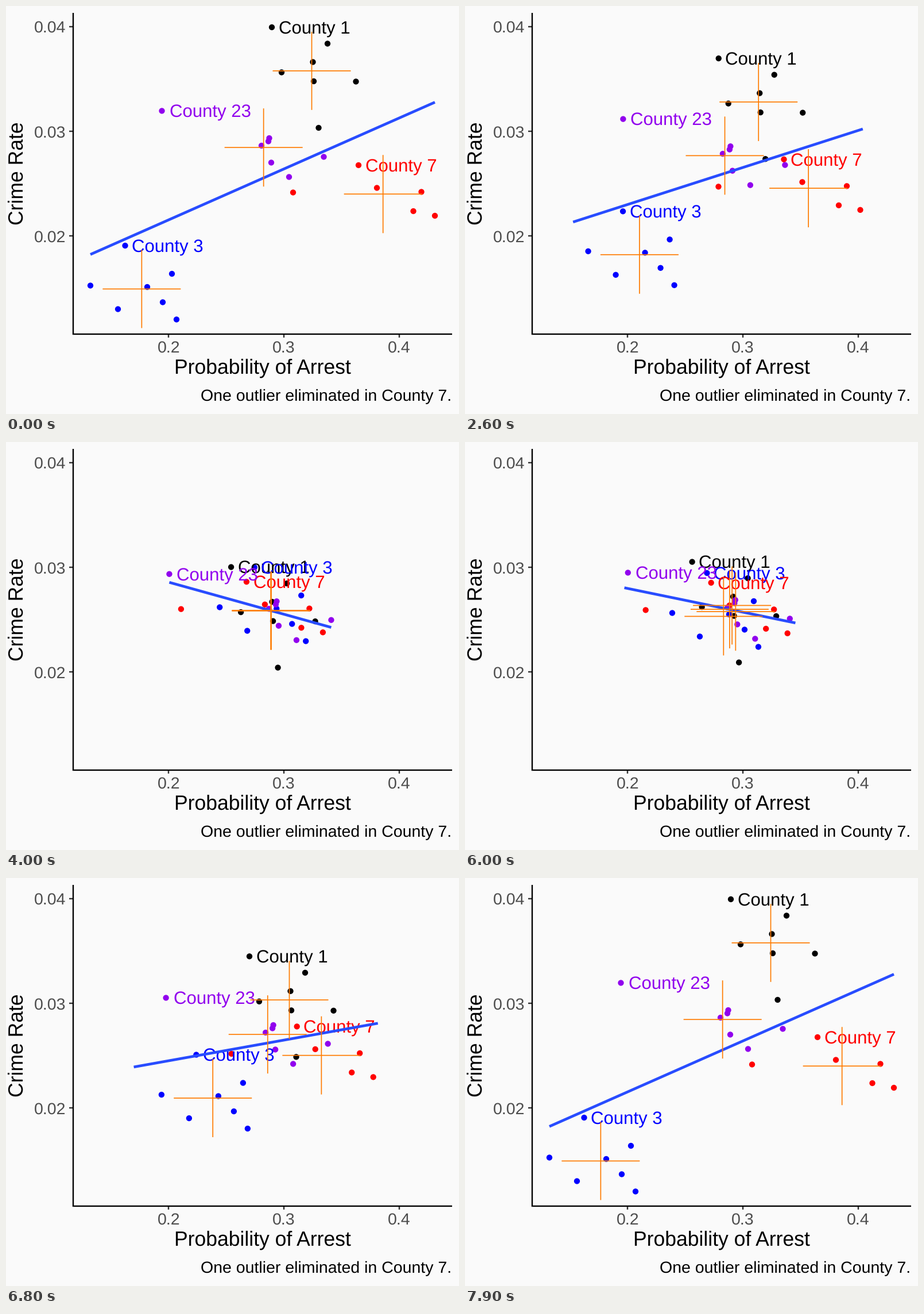
Animation of 789 by 710 pixels, one loop 8000 ms. Source, as a matplotlib script:

```python
import numpy as np
import matplotlib.pyplot as plt
from matplotlib.animation import FuncAnimation

W, H, DPI = 789, 710, 160
PX = 72 / DPI  # points per pixel
FRAMES, STEP_MS = 80, 100
HOLD, MOVE = 20, 20  # frames at rest, frames in motion

plt.rcParams["font.family"] = "Liberation Sans"
plt.rcParams["text.hinting"] = "none"

# label, colour, yearly observations (pixels); the first one carries the label
COUNTIES = [
    ("County 1", "#000000", [(463, 37), (560, 65.5), (534.5, 97.5), (480, 115.5),
                             (536, 131), (609.5, 131.5), (544.5, 212)]),
    ("County 3", "#0000ff", [(207.5, 417), (147, 486.5), (195, 527.5), (246, 489),
                             (289, 466), (273, 515.5), (297, 545.5)]),
    ("County 7", "#ff0000", [(614, 277), (646, 316.5), (723.5, 323.5),
                             (709.5, 357), (747, 365), (500, 324.5)]),
    ("County 23", "#9100ee", [(271.5, 182.5), (445, 243), (457, 235.5), (458.5, 230),
                              (462, 272.5), (493, 297.5), (553.5, 262.5)]),
]
groups = [np.array(pts, float) for _, _, pts in COUNTIES]
means = [g.mean(axis=0) for g in groups]
raw = np.vstack(groups)
center = raw.mean(axis=0)
shifts = [center - m for m in means]
shift_all = np.vstack([np.tile(s, (len(g), 1)) for s, g in zip(shifts, groups)])
colors = [c for _, c, pts in COUNTIES for _ in pts]


def fit_ends(pts):
    slope, base = np.polyfit(pts[:, 0], pts[:, 1], 1)
    x = np.array([pts[:, 0].min(), pts[:, 0].max()])
    return x, slope * x + base


raw_fit = np.array(fit_ends(raw))
within_fit = np.array(fit_ends(raw + shift_all))

fig = plt.figure(figsize=(W / DPI, H / DPI), dpi=DPI, facecolor="#fafafa")
ax = fig.add_axes([0, 0, 1, 1])
ax.set_xlim(0, W)
ax.set_ylim(H, 0)
ax.axis("off")


def line(xs, ys, color, width, z):
    return ax.plot(xs, ys, color=color, lw=width * PX, zorder=z,
                   solid_capstyle="butt", solid_joinstyle="miter")[0]


def text(x, y, s, size, color="#000000", ha="center", z=3, **kw):
    return ax.text(x, y, s, fontsize=size, color=color, ha=ha,
                   va="baseline", zorder=z, **kw)


# axes
for k, label in enumerate(("0.04", "0.03", "0.02")):
    y = 35.5 + 182.3 * k
    line([110.5, 117], [y, y], "#333333", 2.4, 1)
    text(104.5, y + 10.5, label, 12.8, "#4d4d4d", "right")
for k, label in enumerate(("0.2", "0.3", "0.4")):
    x = 283.5 + 200.6 * k
    line([x, x], [571, 577], "#333333", 2.4, 1)
    text(x, 602.5, label, 12.8, "#4d4d4d")
line([117, 117], [12, 572], "#000000", 2.4, 1.1)
line([116, 777], [571, 571], "#000000", 2.4, 1.1)
text(447, 640, "Probability of Arrest", 16)
text(37.5, 291.5, "Crime Rate", 16, rotation=90).set(ha="right", va="center")
text(776.5, 687, "One outlier eliminated in County 7.", 12.8, ha="right")

# moving parts
dots = ax.scatter(raw[:, 0], raw[:, 1], s=(10.3 * PX) ** 2, c=colors,
                  linewidths=0, zorder=4)
labels = [text(0, 0, name, 14, color, "left", 5) for name, color, _ in COUNTIES]
trend = line([], [], "#284cff", 4.7, 6)
ORANGE, ARM = "#ff7b00", 68
crosses = [(line([], [], ORANGE, 1.7, 7), line([], [], ORANGE, 1.7, 7))
           for _ in COUNTIES]
for bar in (b for pair in crosses for b in pair):
    bar.set_snap(False)


def progress(i):
    """0 = raw data, 1 = every county mean moved to the overall mean."""
    if i < 2 * HOLD + MOVE:
        return min(max(i - HOLD, 0) / MOVE, 1)
    return 1 - (i - 2 * HOLD - MOVE + 1) / MOVE


def draw(i):
    p = progress(i)
    dots.set_offsets(raw + p * shift_all)
    trend.set_data(*(raw_fit + p * (within_fit - raw_fit)))
    for g, m, s, lab, (bar, post) in zip(groups, means, shifts, labels, crosses):
        x, y = g[0] + p * s
        lab.set_position((x + 1.45 * len(lab.get_text()), y + 11.3))
        x, y = m + p * s
        bar.set_data([x - ARM, x + ARM], [y, y])
        post.set_data([x, x], [y - ARM, y + ARM])
    return [dots, trend, *labels, *(b for pair in crosses for b in pair)]


anim = FuncAnimation(fig, draw, frames=FRAMES, init_func=lambda: draw(0),
                     interval=STEP_MS, repeat=True, repeat_delay=0, blit=False)
plt.show()
```
